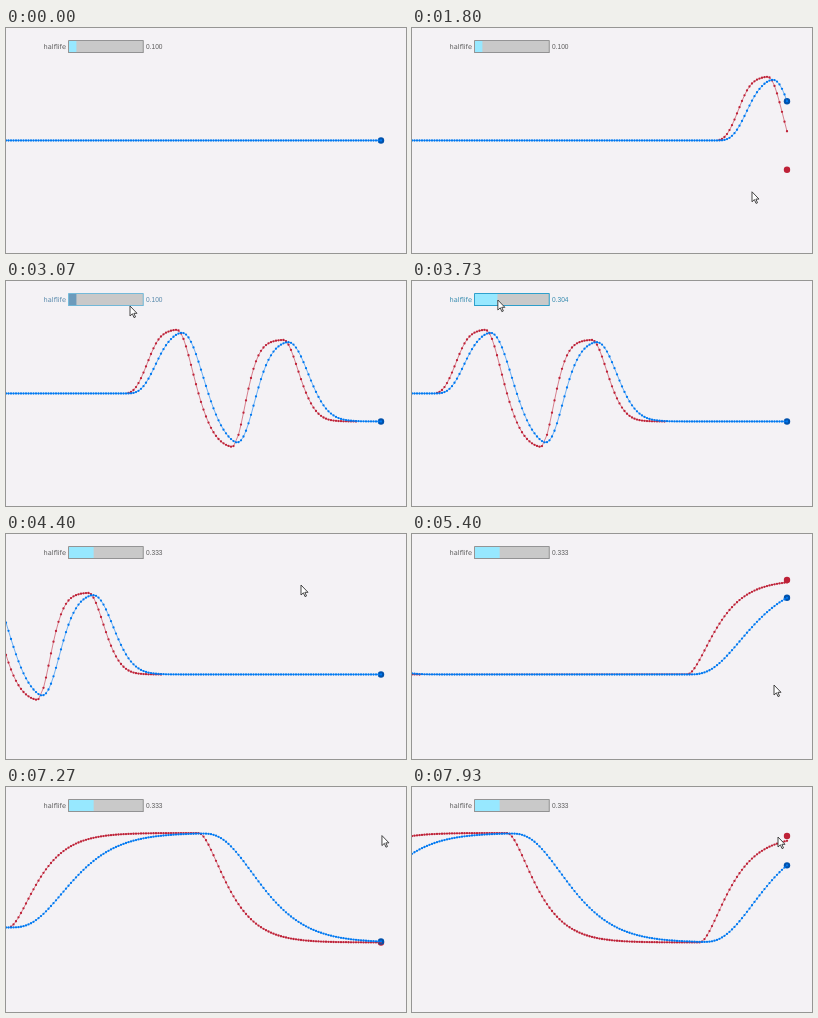
Animation of 400x225 px, one loop 8 s. Source, as an HTML page with a canvas:

```html
<!DOCTYPE html>
<html lang="en">
<head>
<meta charset="utf-8">
<title>Double spring damper</title>
<style>
html, body { margin: 0; width: 100%; height: 100%; overflow: hidden; background: #f4f2f5; }
canvas { display: block; width: 100vw; height: 100vh; }
</style>
</head>
<body>
<canvas id="stage" width="400" height="225"></canvas>
<script>
const ctx = document.getElementById('stage').getContext('2d');
const LOOP = 8000, FPS = 15;
const TICK_MS = 17.065, DT = 1 / 60, SPACING = 2.5, HEAD_X = 375;
const RED = '#be2137', BLUE = '#0079f1', DARK_BLUE = '#0052ac';
const REST_Y = 112.5;

const smooth = u => u * u * (3 - 2 * u);
const easeOut = u => 1 - (1 - u) ** 3;

const move = (at, ms, to, ease = smooth) => ({ at, ms, to, ease });
const jump = (at, to) => move(at, 1, to);

// Value at time t after a series of eased moves.
function follow(moves, from, t) {
  return moves.reduce((value, { at, ms, to, ease }) => {
    const u = Math.min(1, Math.max(0, (t - at) / ms));
    return value + (to - value) * ease(u);
  }, from);
}

// Two dragged waves, then three clicks
const goalMoves = [
  move(1298, 212, 48), move(1660, 350, 167.5, easeOut),
  move(2039, 191, 58.5, easeOut), move(2387, 280, 140.5, easeOut),
  jump(4717, 46), jump(6013, 155.5), jump(7324, 49)
];
const pointerStart = 860, pointerX = 16, pointerY = 156;
const pointerMoves = [
  [860, 410, 340, 112], [2667, 400, 124, 25], [3070, 330, 71, 19], [3500, 300, 88, 19],
  [3950, 450, 295, 51], [4400, 250, 350, 46], [4780, 620, 362, 151], [5400, 1200, 357, 162],
  [6600, 270, 374, 24], [6870, 430, 376, 49], [7600, 330, 366, 50]
];
const pointerXMoves = pointerMoves.map(([at, ms, x]) => move(at, ms, x));
const pointerYMoves = pointerMoves.map(([at, ms, , y]) => move(at, ms, y));
const DRAG = [1270, 2667], HOVER = [2990, 4020], PRESS = [3460, 3920];
const DRAG_LEAD = 100;

const within = (t, [from, to]) => t >= from && t < to;
const goalAt = t => follow(goalMoves, REST_Y, t);
const halflifeAt = t => follow([move(3500, 300, 0.333)], 0.1, t);

function stepSpring(s, goal, halflife) {
  const y = 2 * Math.LN2 / halflife, decay = Math.exp(-y * DT);
  const offset = s.x - goal, j = s.v + offset * y;
  s.x = decay * (offset + j * DT) + goal;
  s.v = decay * (s.v - j * y * DT);
}

// The first spring chases the goal, the second chases the first.
const redTrail = [], blueTrail = [];
const inner = { x: REST_Y, v: 0 }, outer = { x: REST_Y, v: 0 };
for (let t = 0; t <= LOOP; t += TICK_MS) {
  const half = halflifeAt(t) / 2;
  stepSpring(inner, goalAt(t), half);
  stepSpring(outer, inner.x, half);
  redTrail.push(inner.x);
  blueTrail.push(outer.x);
}

function disc(x, y, r, color) {
  ctx.fillStyle = color;
  ctx.beginPath();
  ctx.arc(x, y, r, 0, 2 * Math.PI);
  ctx.fill();
}

function trailPoints(trail, tick) {
  return Array.from({ length: 152 }, (_, k) => [HEAD_X - k * SPACING, trail[Math.max(0, tick - k)]]);
}

function drawTrail(points, color) {
  ctx.strokeStyle = color;
  ctx.lineWidth = 0.55;
  ctx.beginPath();
  points.forEach(([x, y]) => ctx.lineTo(x, y));
  ctx.stroke();
  points.forEach(([x, y]) => disc(x, y, 1.15, color));
}

function drawSlider(t) {
  const value = halflifeAt(t);
  let border = '#838383', fill = '#97e8ff', text = '#5c5c5c';
  if (within(t, PRESS)) [border, text] = ['#0492c7', '#368baf'];
  else if (within(t, HOVER)) [border, fill, text] = ['#5bb2d9', '#6c9bbc', '#5688ab'];
  ctx.fillStyle = '#c9c9c9';
  ctx.fillRect(62.5, 12.5, 75, 12.2);
  ctx.fillStyle = fill;
  ctx.fillRect(63, 13, 74 * value, 11.2);
  ctx.strokeStyle = border;
  ctx.lineWidth = 0.8;
  ctx.strokeRect(62.6, 12.6, 74.6, 12);
  ctx.fillStyle = text;
  ctx.font = '6.6px "DejaVu Sans", sans-serif';
  ctx.textAlign = 'right';
  ctx.fillText('halflife', 60, 21);
  ctx.font = '6.6px "Liberation Sans", sans-serif';
  ctx.textAlign = 'left';
  ctx.fillText(value.toFixed(3), 140, 21);
}

const arrow = new Path2D('M0 0V10L2.4 7.8L4 11.6L5.5 11L3.9 7.3H7Z');

function drawPointer(t) {
  if (t < pointerStart) return;
  const x = follow(pointerXMoves, pointerX, t);
  const y = within(t, DRAG) ? goalAt(t + DRAG_LEAD) : follow(pointerYMoves, pointerY, t);
  ctx.save();
  ctx.translate(x, y);
  ctx.fillStyle = '#fff';
  ctx.fill(arrow);
  ctx.strokeStyle = '#333';
  ctx.lineWidth = 0.9;
  ctx.stroke(arrow);
  ctx.restore();
}

function draw(now) {
  const t = Math.floor((now % LOOP + 4) * FPS / 1000) * 1000 / FPS;
  const tick = Math.min(redTrail.length - 1, Math.floor(t / TICK_MS));
  const blue = trailPoints(blueTrail, tick);
  // Red is left out where blue covers it, so no fringe shows.
  const red = trailPoints(redTrail, tick).filter(([, y], k) => Math.abs(y - blue[k][1]) > 0.3);
  const goal = goalAt(t);
  ctx.fillStyle = '#f4f2f5';
  ctx.fillRect(0, 0, 400, 225);
  if (Math.abs(goal - blue[0][1]) > 0.3) disc(HEAD_X, goal, 3.2, RED);
  disc(HEAD_X, blue[0][1], 3.2, DARK_BLUE);
  drawTrail(red, RED);
  drawTrail(blue, BLUE);
  drawSlider(t);
  drawPointer(t);
}

const start = performance.now();
function frame() {
  draw(performance.now() - start);
  requestAnimationFrame(frame);
}
frame();
</script>
</body>
</html>
```
